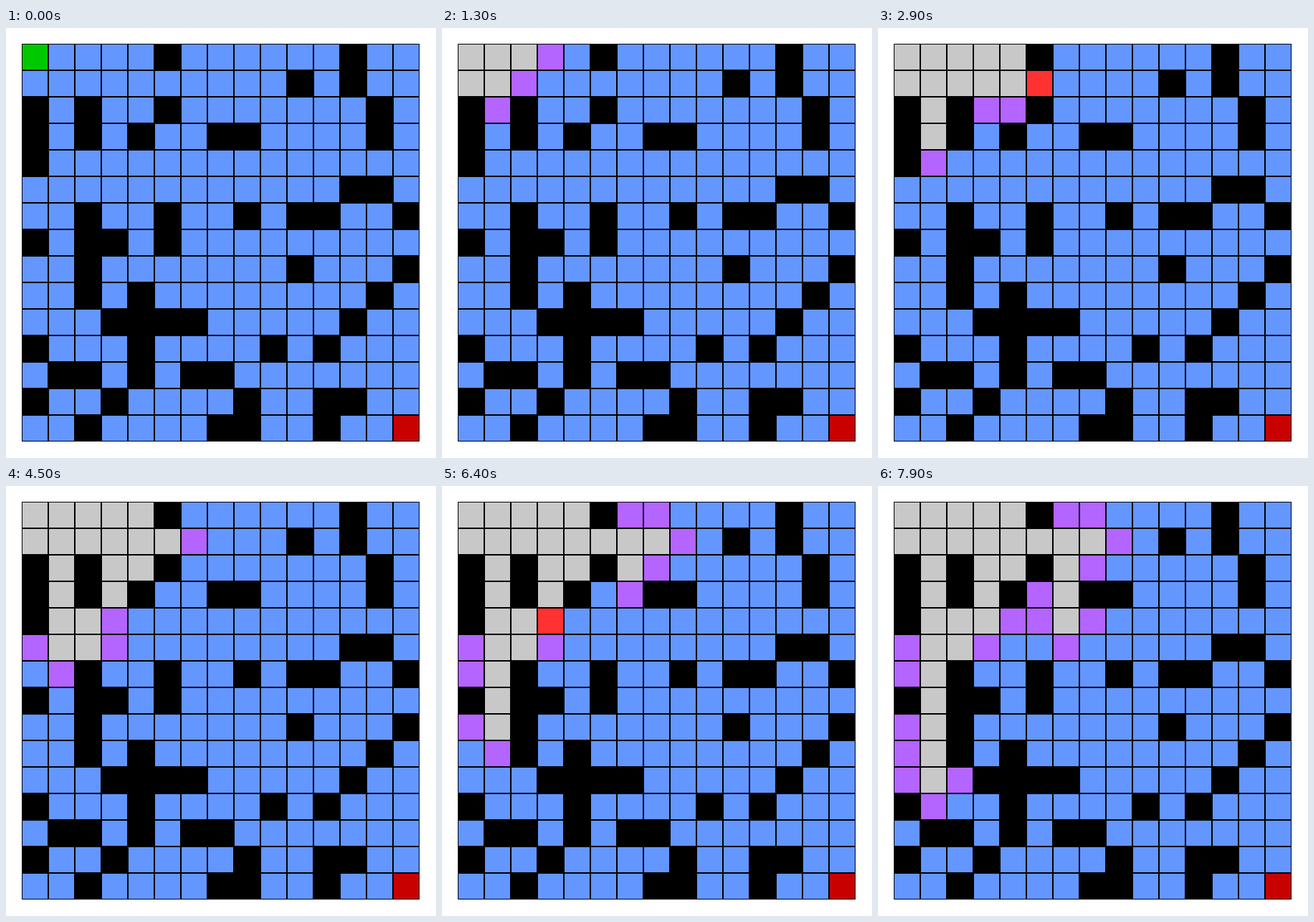
Write a matplotlib script that moves like this. It is 600 px wide and 600 px high and loops after 8000 ms.

```python
import matplotlib.pyplot as plt
from matplotlib.animation import FuncAnimation
from matplotlib.patches import Rectangle

SIZE, DPI = 600, 100
N, CELL, MARGIN = 15, 37, 22
FRAMES, INTERVAL = 80, 100

FREE, WALL = "#6496ff", "#000000"
START, GOAL = "#00c800", "#c80000"
OPEN, CLOSED, CURRENT = "#b464ff", "#c8c8c8", "#ff3232"

MAZE = """
.....#......#..
..........#.#..
#.#..#.......#.
#.#.#..##....#.
#..............
............##.
..#..#..#.##..#
#.##.#.........
..#.......#...#
..#.#........#.
...####.....#..
#...#....#.#...
.##.#.##.......
#..#....#..##..
..#....##..#...
""".split()

start, goal = (0, 0), (N - 1, N - 1)


def sift_down(heap, pos):
    """Move the item at pos towards the root while it beats its parent."""
    item = heap[pos]
    while pos > 0:
        parent = (pos - 1) // 2
        if not item[0] < heap[parent][0]:
            break
        heap[pos] = heap[parent]
        pos = parent
    heap[pos] = item


def push(heap, item):
    heap.append(item)
    sift_down(heap, len(heap) - 1)


def pop(heap):
    """Take the root; ties between children go to the right one."""
    last = heap.pop()
    if not heap:
        return last
    top, pos, end = heap[0], 0, len(heap)
    child = 1
    while child < end:
        right = child + 1
        if right < end and not heap[child][0] < heap[right][0]:
            child = right
        heap[pos] = heap[child]
        pos = child
        child = 2 * pos + 1
    heap[pos] = last
    sift_down(heap, pos)
    return top


def neighbours(cell):
    x, y = cell
    for dx, dy in ((1, 0), (-1, 0), (0, 1), (0, -1)):
        i, j = x + dx, y + dy
        if 0 <= i < N and 0 <= j < N and MAZE[j][i] == ".":
            yield i, j


def distance(cell):
    return abs(cell[0] - goal[0]) + abs(cell[1] - goal[1])


def search():
    """A* from start to goal, yielding one (cell, color) event per step."""
    cost = {start: 0}
    heap = [(distance(start), start)]
    yield start, OPEN
    while heap:
        cell = pop(heap)[1]
        yield cell, CURRENT
        if cell == goal:
            return
        for other in neighbours(cell):
            if other not in cost:
                cost[other] = cost[cell] + 1
                push(heap, (cost[other] + distance(other), other))
                yield other, OPEN


events = list(search())

fig = plt.figure(figsize=(SIZE / DPI, SIZE / DPI), dpi=DPI, facecolor="white")
ax = fig.add_axes([0, 0, 1, 1])
ax.set_xlim(0, SIZE)
ax.set_ylim(SIZE, 0)
ax.axis("off")


def square(x, y, size, color):
    return ax.add_patch(Rectangle((x, y), size, size, facecolor=color,
                                  linewidth=0, antialiased=False))


square(MARGIN, MARGIN, N * CELL, WALL)
base = {(x, y): FREE for y in range(N) for x in range(N) if MAZE[y][x] == "."}
base[start], base[goal] = START, GOAL
tiles = {(x, y): square(MARGIN + x * CELL + 1, MARGIN + y * CELL + 1, CELL - 2, c)
         for (x, y), c in base.items()}


def update(frame):
    colors = dict(base)
    done = events[:frame]
    for cell, color in done:
        colors[cell] = CLOSED if color == CURRENT else color
    if done:
        cell, color = done[-1]
        colors[cell] = color
    for cell, tile in tiles.items():
        tile.set_facecolor(colors[cell])
    return list(tiles.values())


anim = FuncAnimation(fig, update, frames=FRAMES, interval=INTERVAL,
                     repeat=True, repeat_delay=0, blit=False)
plt.show()
```
